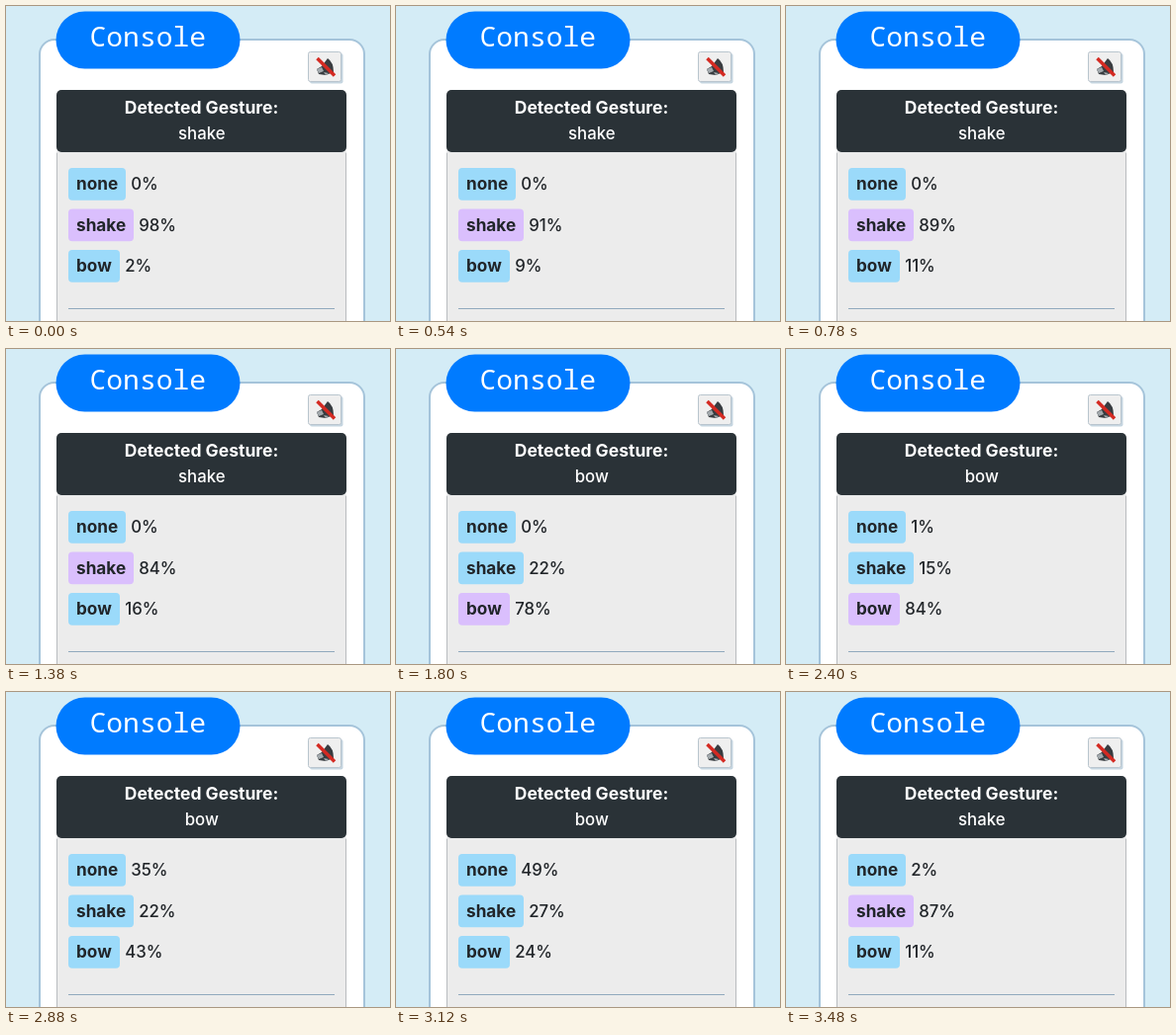
Recreate the animation shown at these times as an HTML page. Size 388x319 px, loop 3.66 s.

```html
<!DOCTYPE html>
<html lang="en">
<head>
<meta charset="utf-8">
<title>Gesture console</title>
<style>
  html, body { margin: 0; width: 100%; height: 100%; overflow: hidden; background: #d4ecf6; }
  svg { display: block; width: 100%; height: 100%; }
  text { font: 450 16.8px Inter, "Open Sans", sans-serif; fill: #212529; }
  .bold { font-size: 17.2px; font-weight: 700; }
  .heading { font-size: 17.5px; font-weight: 700; }
  .light { fill: #fff; text-anchor: middle; }
  .title { font: 500 28px "Noto Sans Mono", "DejaVu Sans Mono", monospace; fill: #fff; text-anchor: middle; }
</style>
</head>
<body>
<svg viewBox="0 0 388 319">
  <rect width="388" height="319" fill="#d4ecf6"/>
  <rect x="34" y="34" width="328" height="320" rx="15" fill="#fff" stroke="#a5c4da" stroke-width="2"/>
  <rect x="50.5" y="5.5" width="186" height="58" rx="29" fill="#007bff"/>
  <text class="title" x="143.3" y="41">Console</text>

  <rect x="307" y="48" width="33.5" height="30.5" rx="2" fill="#c5d5e0"/>
  <rect x="305.5" y="46.5" width="33" height="30" rx="2" fill="#efefef" stroke="#b9c5ce"/>
  <g id="mute">
    <path d="M314 64 L319 61 L325 53 Q331 57 331 67 L323 70 L316 69 Z" fill="#383c40"/>
    <path d="M314 64 l5 -2 2 4 -5 2 z M321 67 l5 1 -3 2 z" fill="#a3a9ad"/>
    <path d="M314.5 53 L332 70.5" stroke="#d42a22" stroke-width="3.6"/>
  </g>

  <rect x="51.5" y="148" width="292" height="200" fill="#ececec" stroke="#b9bcbf"/>
  <path d="M51 148h293" stroke="#fff"/>
  <rect x="51" y="85" width="293" height="63" rx="5" fill="#2a3237"/>
  <text class="heading light" x="197.5" y="109">Detected Gesture:</text>
  <text class="light" id="gesture" x="197.8" y="135"></text>
  <g id="rows"></g>
  <path d="M63 306.5H332" stroke="#91a9bd"/>
</svg>
<script>
const LOOP = 3660, TICK = 60;
const BLUE = '#9bdafa', PURPLE = '#dabffd';
const THRESHOLD = 50;
const GESTURES = ['none', 'shake', 'bow'];

// Readings move in even steps from each key point to the next; bow takes the rest.
const KEYS = [
  { at: 0, none: 0, shake: 98, steps: 2 },
  { at: 540, none: 0, shake: 91, steps: 3 },
  { at: 1380, none: 0, shake: 84, steps: 4 },
  { at: 1620, none: 0, shake: 28, steps: 1 },
  { at: 1800, none: 0, shake: 22, steps: 3 },
  { at: 2400, none: 1, shake: 15, steps: 1 },
  { at: 2640, none: 3, shake: 15, steps: 5 },
  { at: 2940, none: 43, shake: 24, steps: 1 },
  { at: 3120, none: 49, shake: 27, steps: 2 },
  { at: 3240, none: 5, shake: 84, steps: 1 },
  { at: 3480, none: 2, shake: 87, steps: 1 }
];

const mix = (a, b, t) => a + (b - a) * t;

function buildReadings() {
  const readings = [];
  let detected = 'shake';
  KEYS.forEach((key, k) => {
    const next = KEYS[k + 1] || key;
    for (let i = 0; i < key.steps; i++) {
      const t = i / key.steps;
      const none = Math.round(mix(key.none, next.none, t));
      const shake = Math.round(mix(key.shake, next.shake, t));
      const percents = [none, shake, 100 - none - shake];
      // The heading keeps the last gesture that passed the threshold.
      const winner = percents.findIndex(percent => percent > THRESHOLD);
      if (winner >= 0) detected = GESTURES[winner];
      const start = Math.floor(mix(key.at, next.at, t) / TICK) * TICK;
      readings.push({ start, percents, detected });
    }
  });
  return readings;
}

const heading = document.getElementById('gesture');
const container = document.getElementById('rows');

function add(tag, attributes, content = '') {
  const node = document.createElementNS('http://www.w3.org/2000/svg', tag);
  for (const key in attributes) node.setAttribute(key, attributes[key]);
  node.textContent = content;
  return container.appendChild(node);
}

const rows = GESTURES.map((name, i) => {
  const y = 164 + 41.5 * i;
  const chip = add('rect', { x: 63, y, height: 32.7, rx: 4 });
  const label = add('text', { class: 'bold', x: 71, y: Math.floor(y + 22.5) }, name);
  const value = add('text', { y: Math.floor(y + 22.5) });
  return { chip, label, value };
});

// Each chip is as wide as its label plus padding.
function layout() {
  for (const { chip, label, value } of rows) {
    const width = Math.round(label.getComputedTextLength() + 16);
    chip.setAttribute('width', width);
    value.setAttribute('x', 63 + width + 5.2);
  }
}

const readings = buildReadings();
let shown;

function draw(now) {
  const time = now % LOOP;
  const reading = readings.findLast(({ start }) => start <= time);
  if (reading !== shown) {
    shown = reading;
    heading.textContent = reading.detected;
    rows.forEach(({ chip, value }, i) => {
      const percent = reading.percents[i];
      chip.setAttribute('fill', percent > THRESHOLD ? PURPLE : BLUE);
      value.textContent = percent + '%';
    });
  }
  requestAnimationFrame(draw);
}

layout();
draw(0);
</script>
</body>
</html>
```
